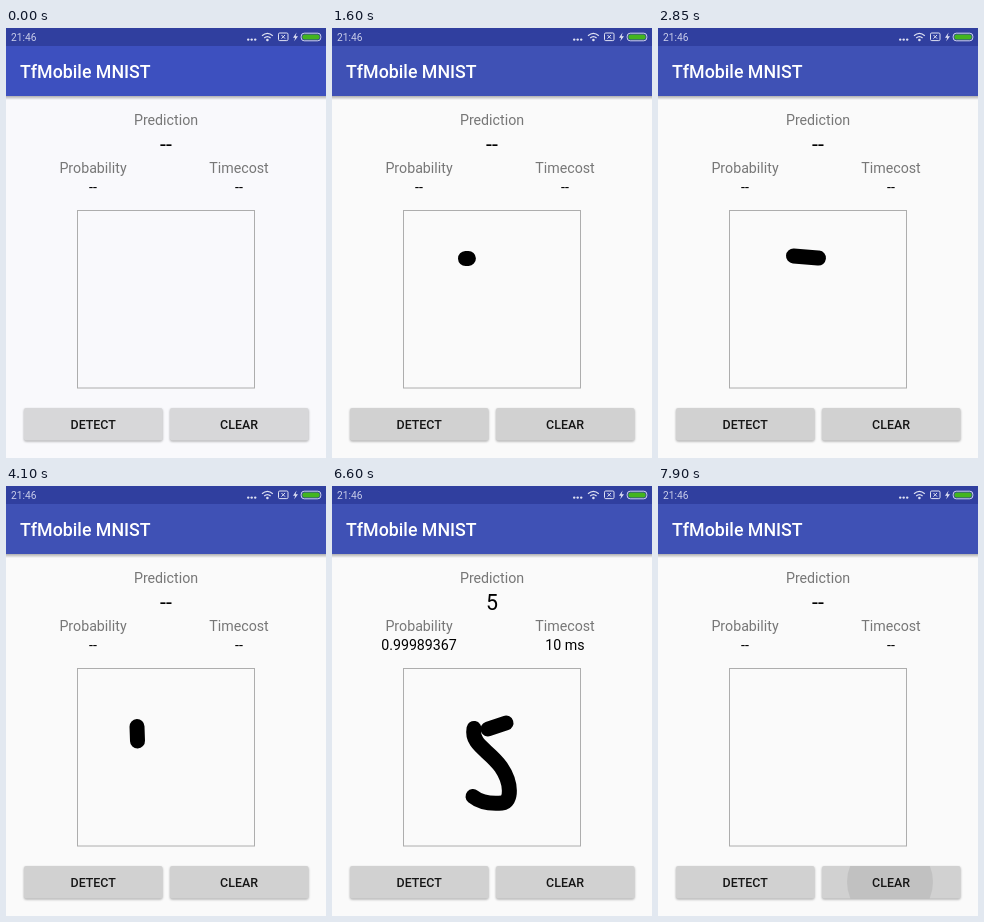
Animation of 320x430 px, one loop 8 s. Source, as an HTML page:

```html
<!DOCTYPE html>
<html lang="en">
<head>
<meta charset="utf-8">
<title>Digit pad</title>
<style>
html, body { margin: 0; width: 100%; height: 100%; overflow: hidden; }
svg { display: block; width: 320px; height: 430px; font-family: Roboto, sans-serif; }
.mid { text-anchor: middle; }
.label { font-size: 14.22px; fill: #777; }
.value { font-size: 14.22px; fill: #000; }
.btn { font-size: 12.44px; font-weight: 500; fill: #161616; }
.key { filter: drop-shadow(0 1.2px 1px rgba(0,0,0,.32)); }
.ink path { fill: none; stroke: #000; stroke-width: 15; stroke-linecap: round; stroke-linejoin: round; }
</style>
</head>
<body>
<svg viewBox="0 0 320 430">
  <defs>
    <linearGradient id="shade" x2="0" y2="1">
      <stop offset="0" stop-color="#000" stop-opacity=".3"/>
      <stop offset="1" stop-color="#000" stop-opacity="0"/>
    </linearGradient>
    <clipPath id="left"><rect x="18" y="380" width="138.5" height="32.5" rx="2"/></clipPath>
    <clipPath id="right"><rect x="164" y="380" width="138.5" height="32.5" rx="2"/></clipPath>
  </defs>

  <rect id="page" width="320" height="430"/>
  <rect y="68" width="320" height="4" fill="url(#shade)"/>
  <rect id="bar" y="18" width="320" height="50"/>
  <rect width="320" height="18" fill="#303f9f"/>

  <text x="5" y="13" font-size="10.2" fill="#c9cdea">21:46</text>
  <g fill="#dfe2f3">
    <circle cx="242.2" cy="11.6" r="1.2"/>
    <circle cx="245.7" cy="11.6" r="1.2"/>
    <circle cx="249.2" cy="11.6" r="1.2"/>
    <circle cx="261.4" cy="12" r="1.3"/>
    <path d="M290.6 4.6L287 9.8H289.2L288.2 13.2L292 8.2H289.6Z"/>
  </g>
  <g fill="none" stroke="#dfe2f3" stroke-width="1.2">
    <path d="M256 7.7Q261.4 3 266.8 7.7M258.2 10Q261.4 7.2 264.6 10"/>
    <rect x="272.5" y="5" width="9.5" height="7.6" rx="1.2" stroke-width="1"/>
    <path d="M275.5 7l3.5 3.6m0-3.6l-3.5 3.6" stroke-width="1"/>
    <rect x="295.2" y="5.2" width="19.6" height="7.6" rx="3" stroke-width=".9"/>
  </g>
  <rect x="296.4" y="6.4" width="17.2" height="5.2" rx="2" fill="#43b51f"/>

  <text x="14" y="49.5" font-size="17.8" font-weight="500" fill="#fff">TfMobile MNIST</text>

  <g class="mid">
    <text class="label" x="160" y="97">Prediction</text>
    <text id="digit" x="160" y="124" font-size="21.33"></text>
    <text class="label" x="87" y="145">Probability</text>
    <text id="prob" class="value" x="87" y="164.3"></text>
    <text class="label" x="233" y="145">Timecost</text>
    <text id="cost" class="value" x="233" y="164.3"></text>
  </g>

  <rect x="71.5" y="182.5" width="177" height="177.5" fill="none" stroke="#adadad"/>
  <g id="ink" class="ink"></g>

  <g id="keys">
    <rect class="key" x="18" y="380" width="138.5" height="32.5" rx="2"/>
    <rect class="key" x="164" y="380" width="138.5" height="32.5" rx="2"/>
  </g>
  <g fill="#000" fill-opacity=".075">
    <g clip-path="url(#left)"><circle id="tapL"/></g>
    <g clip-path="url(#right)"><circle id="tapR"/></g>
  </g>
  <g class="mid">
    <text class="btn" x="87.2" y="401">DETECT</text>
    <text class="btn" x="233" y="401">CLEAR</text>
  </g>
</svg>
<script>
const LOOP = 8000, STEP = 50;
const $ = id => document.getElementById(id);

// strokes: [path, start, end, length at start]; detect and clear: [start, end]
const rounds = [
  { prob: '0.9997241', cost: '12 ms', detect: [850, 1000], clear: [1150, 1300], at: [231, 396],
    strokes: [['M161 235C161 260 160 290 160 315', 450, 700, 3]] },
  { prob: '0.9998462', cost: '10 ms', detect: [2150, 2300], clear: [2450, 2550], at: [230, 396],
    strokes: [['M133.5 230.5C150 230 172 230 173 248C174 270 148 293 136 312C150 308 170 311 188 312', 1600, 1950, 3]] },
  { prob: '0.99976158', cost: '11 ms', detect: [3450, 3650], clear: [3750, 4100], at: [229, 396],
    strokes: [['M135.5 228L160 230C180 232 176 250 152 267C178 266 187 285 179 302C172 317 153 318 138 312', 2850, 3300, 25]] },
  { prob: '0.9996825', cost: '10 ms', detect: [4800, 4950], clear: [5100, 5500], at: [220, 393],
    strokes: [['M131 240.5L131.5 255C132 268 131 276 132 284C148 283 168 284 188 283', 4100, 4300, 14.5],
              ['M169.5 239.5C168 265 163 290 161.5 315.5', 4500, 4650, 8]] },
  { prob: '0.99989367', cost: '10 ms', detect: [6250, 6400], clear: [6600, 6700], at: [232, 396],
    strokes: [['M142 242.5C139 259 157 264 169 281C180 297 180 316 170 317C159 318 149 317 141 310.5', 5500, 5800, 3],
              ['M156 243L174 237', 6000, 6100, 5]] },
  { prob: '0.99938214', cost: '10 ms', detect: [7550, 7650], clear: [7800, 8000], at: [232, 396],
    strokes: [['M172 231.5C157 250 148 275 149 296C151 318 178 320 182 303C184 287 164 281 152 299', 7000, 7350, 5]] }
];

for (const r of rounds) {
  r.lines = r.strokes.map(([d, start, end, first]) => {
    const path = document.createElementNS('http://www.w3.org/2000/svg', 'path');
    path.setAttribute('d', d);
    $('ink').append(path);
    return { path, start, end, first, total: path.getTotalLength() };
  });
}

const within = (t, [a, b]) => t >= a && t < b;

function ripple(id, t, span, [x, y]) {
  const age = within(t, span) ? (t - span[0]) / STEP : 0;
  const c = $(id);
  c.setAttribute('cx', x);
  c.setAttribute('cy', y);
  c.setAttribute('r', Math.min(25 * age, 43));
}

function draw(ms) {
  const t = Math.floor(ms % LOOP / STEP) * STEP;
  const early = t < 450;
  $('page').setAttribute('fill', early ? '#f9f9fc' : '#fafafa');
  $('bar').setAttribute('fill', early ? '#3d50bf' : '#3f51b5');
  $('keys').setAttribute('fill', early ? '#d7d7d9' : '#d1d1d1');

  const now = Math.max(0, rounds.findIndex(r => t < r.clear[1]));
  const cur = rounds[now];
  const cleared = t >= cur.clear[0] + STEP;
  const shown = t >= cur.detect[0] + STEP && !cleared;
  $('digit').textContent = shown ? now + 1 : '--';
  $('prob').textContent = shown ? cur.prob : '--';
  $('cost').textContent = shown ? cur.cost : '--';

  for (const r of rounds) {
    for (const s of r.lines) {
      const on = r === cur && t >= s.start && !cleared;
      s.path.style.display = on ? '' : 'none';
      if (!on) continue;
      const p = Math.min(1, (t - s.start) / (s.end - s.start));
      const len = s.first + (s.total - s.first) * p;
      s.path.style.strokeDasharray = p < 1 ? `${len} 999` : 'none';
    }
  }
  ripple('tapL', t, cur.detect, [87, 396]);
  ripple('tapR', t, cur.clear, cur.at);
}

const begin = performance.now();
function tick() {
  draw(performance.now() - begin);
  requestAnimationFrame(tick);
}
tick();
</script>
</body>
</html>
```
